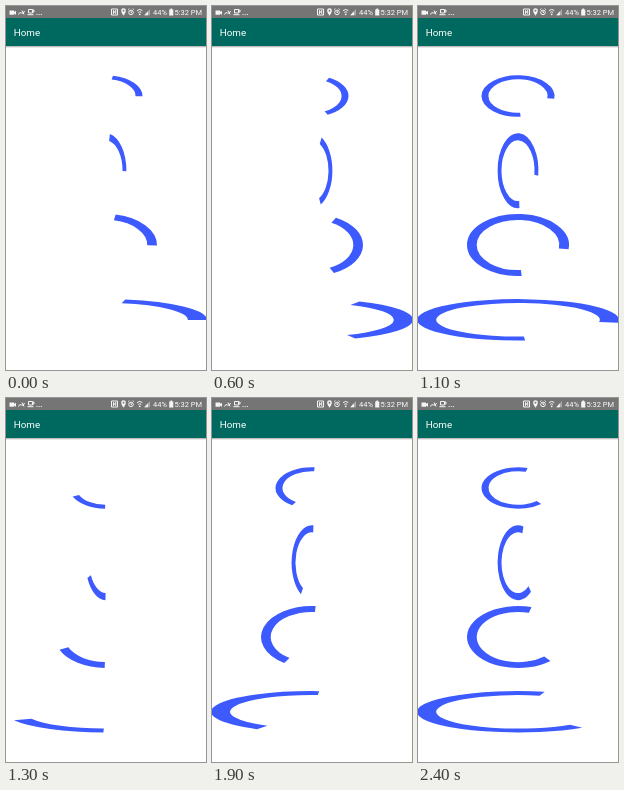
Recreate the animation shown at these times as an HTML page. Size 200 px wide and 364 px high, loop 2500 ms.

```html
<!DOCTYPE html>
<html lang="en">
<head>
<meta charset="utf-8">
<title>Home</title>
<style>
  html, body { margin: 0; width: 100%; height: 100%; overflow: hidden; background: #fff; }
  svg { display: block; width: 200px; height: 364px; }
  text { font-family: Roboto, "Noto Sans", sans-serif; fill: #fff; }
  .status { font-size: 7.5px; }
  .title { font-size: 9.8px; }
  .solid { fill: #f4f4f4; }
  .line { fill: none; stroke: #f4f4f4; stroke-width: 1; }
  .ring { fill: none; stroke: #3d5afe; stroke-width: .19; }
</style>
</head>
<body>
<svg viewBox="0 0 200 364">
  <defs>
    <linearGradient id="shade" x2="0" y2="1">
      <stop offset="0" stop-color="#000" stop-opacity=".35"/>
      <stop offset="1" stop-color="#000" stop-opacity="0"/>
    </linearGradient>
  </defs>
  <rect width="200" height="364" fill="#fff"/>
  <g id="rings"></g>

  <rect y="12" width="200" height="28" fill="#00695f"/>
  <rect y="40" width="200" height="2" fill="url(#shade)"/>
  <text class="title" x="7.8" y="30">Home</text>

  <rect width="200" height="12" fill="#757575"/>
  <!-- notifications -->
  <path class="solid" d="M3.5 4.5h4.5v1.2l2-1v4l-2-1v1.1H3.5z"/>
  <path class="line" d="M12.5 8.5q1-3 3-1.5t3-2M16 4.5l2 4"/>
  <path class="line" d="M22.5 3.5h4v3.5h-4zM26.5 4h1.5v2h-1.5M21.5 8.7h6"/>
  <path class="solid" d="M30.5 8h1v1h-1zm2.2 0h1v1h-1zm2.2 0h1v1h-1z"/>
  <!-- system -->
  <path class="line" d="M105.5 3h6v6h-6zM107.5 8V4.5l2.2 3V4"/>
  <path class="solid" fill-rule="evenodd" d="M117.5 2.3a2.4 2.4 0 0 1 2.4 2.4q0 1.8-2.4 5-2.4-3.2-2.4-5a2.4 2.4 0 0 1 2.4-2.4zm0 1.5a.9.9 0 1 0 0 1.8.9.9 0 1 0 0-1.8z"/>
  <circle class="line" cx="125" cy="6.4" r="2.3"/>
  <path class="line" d="M122.2 3.6l1.2-1M127.8 3.6l-1.2-1M125 5v1.5h1"/>
  <path class="line" d="M131 4.6q2.7-2.4 5.4 0M132.2 6.4q1.5-1.3 3 0"/>
  <circle class="solid" cx="133.7" cy="8.3" r=".9"/>
  <path d="M138.3 9.3l5.7-6.3v6.3z" fill="#aaa"/>
  <path class="solid" d="M138.3 9.3l3.6-4v4z"/>
  <text class="status" x="147" y="8.9">44%</text>
  <path class="solid" d="M163.2 3.4h1.2v-.9h1.7v.9h1.2v6.1h-4.1z"/>
  <text class="status" x="196" y="8.9" text-anchor="end">5:32 PM</text>
</svg>
<script>
const LOOP = 2500, STEP = 100, TRIM = 270, CAP = 12, RADIUS = .905;

// centre y, horizontal radius, vertical radius
const ellipses = [[90, 36.5, 20.7], [164.7, 20.4, 37.5], [239, 51, 31], [313.8, 101, 20.7]];

// time, trim cycles, arc start in degrees clockwise from the top
const keys = [
  [0, .740, 11], [300, 1.237, 373.7], [600, 1.691, 748], [900, 2.245, 1108],
  [1300, 2.763, 1621.5], [1900, 3.672, 2373], [2400, 4.611, 3020.5]
];

// cubic-bezier(.4, 0, .2, 1)
function ease(x) {
  if (x <= 0 || x >= 1) return x <= 0 ? 0 : 1;
  let lo = 0, hi = 1;
  for (let i = 0; i < 24; i++) {
    const s = (lo + hi) / 2, r = 1 - s;
    if (1.2 * s * r * r + .6 * s * s * r + s * s * s < x) lo = s; else hi = s;
  }
  return lo * lo * (3 - 2 * lo);
}

// The head runs in the first half of a cycle, the tail follows in the second.
function trim(cycles) {
  const n = Math.floor(cycles), f = 2 * (cycles - n);
  return { head: TRIM * (n + ease(f)), tail: TRIM * (n + ease(f - 1)) };
}

const track = keys.map(([time, cycles, start]) =>
  ({ time, cycles, spin: start - trim(cycles).tail }));

function arcAt(time) {
  let i = 0;
  while (i < track.length - 2 && time >= track[i + 1].time) i++;
  const a = track[i], b = track[i + 1];
  const k = Math.min(1, (time - a.time) / (b.time - a.time));
  const mix = name => a[name] + (b[name] - a[name]) * k;
  const { head, tail } = trim(mix("cycles"));
  return { start: mix("spin") + tail, sweep: head - tail + CAP };
}

function point(deg) {
  const a = deg * Math.PI / 180;
  return (RADIUS * Math.sin(a)).toFixed(4) + " " + (-RADIUS * Math.cos(a)).toFixed(4);
}

const paths = ellipses.map(([cy, rx, ry]) => {
  const path = document.createElementNS("http://www.w3.org/2000/svg", "path");
  path.setAttribute("class", "ring");
  path.setAttribute("transform", `translate(100 ${cy}) scale(${rx} ${ry})`);
  return document.getElementById("rings").appendChild(path);
});

function draw(now) {
  const time = Math.floor((now % LOOP) / STEP) * STEP;
  const { start, sweep } = arcAt(time);
  const d = `M${point(start)}A${RADIUS} ${RADIUS} 0 ${sweep > 180 ? 1 : 0} 1 ${point(start + sweep)}`;
  paths.forEach(path => path.setAttribute("d", d));
}

const origin = performance.now();
function tick() {
  draw(performance.now() - origin);
  requestAnimationFrame(tick);
}
tick();
</script>
</body>
</html>
```
